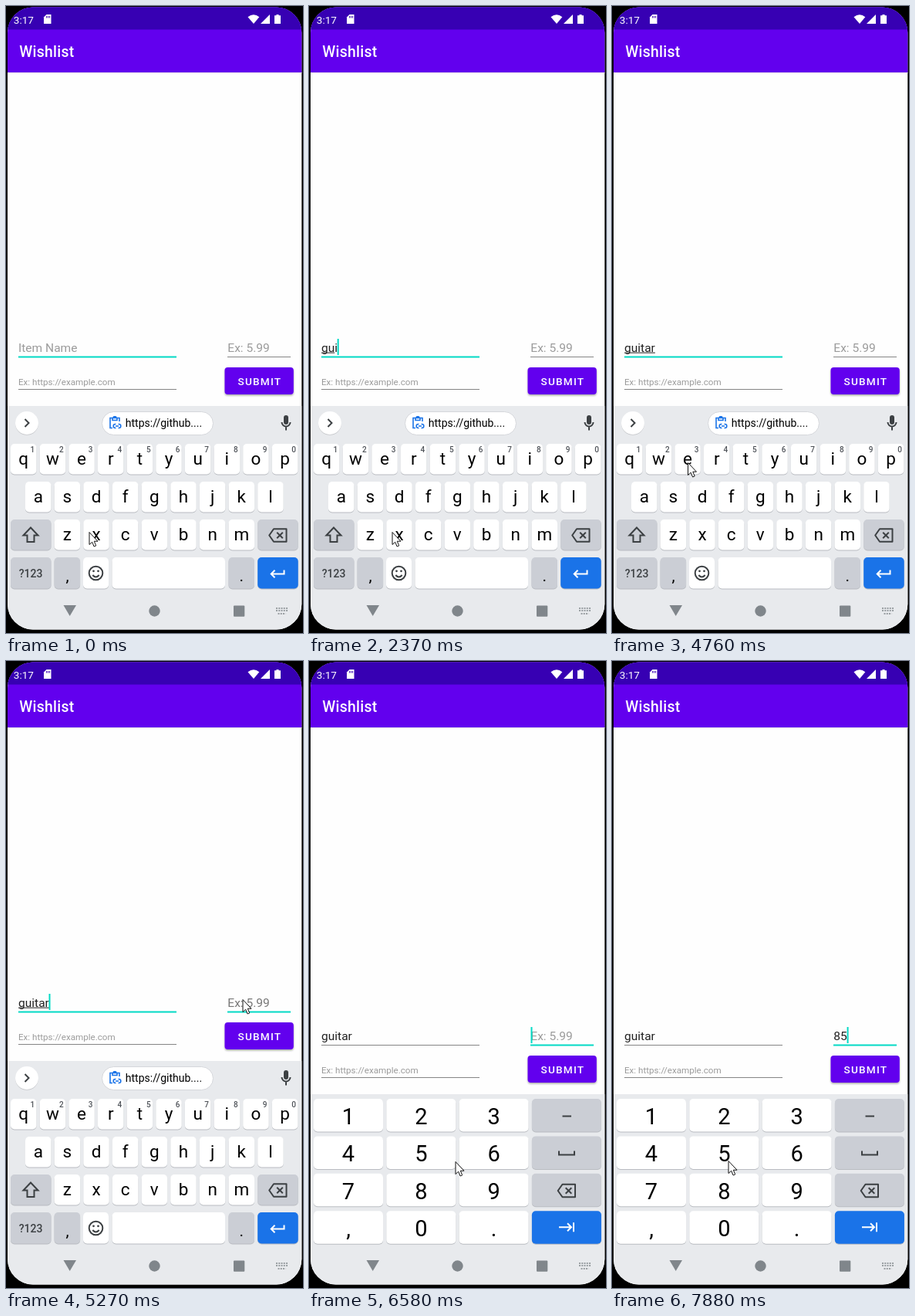
These frames come from a looping animation (385 by 812 pixels, 8000 ms). An HTML page:

```html
<!DOCTYPE html>
<html lang="en">
<head>
<meta charset="utf-8">
<title>Wishlist</title>
<style>
  html, body { margin: 0; width: 100%; height: 100%; overflow: hidden; background: #000; }
  svg { display: block; width: 100vw; height: 100vh; font-family: Roboto, sans-serif; }
  .mid { text-anchor: middle; }
  .medium { font-weight: 500; }
  .field { font-size: 15.55px; fill: #212121; }
  .hint { fill: #9b9b9b; }
  .line { fill: none; stroke: #3c4043; stroke-width: 2; }
</style>
</head>
<body>
<svg viewBox="0 0 385 812">
  <defs>
    <clipPath id="screen"><rect x="2" y="1.5" width="381.3" height="806" rx="33"/></clipPath>
    <filter id="lift" x="-10%" y="-10%" width="120%" height="150%">
      <feDropShadow dx="0" dy="1.5" stdDeviation="1.2" flood-opacity=".35"/>
    </filter>
    <g id="delete" class="line">
      <path d="M-5.5-8.3H11V8.3H-5.5L-11.3 0Z" stroke-linejoin="round"/>
      <path d="M-1.3-3.8 6.3 3.8M6.3-3.8-1.3 3.8"/>
    </g>
  </defs>
  <rect width="385" height="812"/>
  <g clip-path="url(#screen)">
    <rect width="385" height="812" fill="#fefefe"/>
    <rect y="86" width="385" height="1" fill="#e9e9e9"/>
    <rect width="385" height="86" fill="#6200ee"/>
    <rect width="385" height="30.5" fill="#3700b3"/>
    <g fill="#fff">
      <text x="9.8" y="22.5" font-size="13.6">3:17</text>
      <path d="M52.5 11H58.5V23H49V14.5Z"/>
      <path d="M52.5 13v2.5M54.5 13v2.5M56.5 13v2.5" stroke="#3700b3"/>
      <path d="M313.5 14.2Q321 8.500 328.300 14.200L321 23Z"/>
      <path d="M342 11V23H330Z"/>
      <path d="M350.500 11h3v1.300h2.500V23h-8V12.300h2.500Z"/>
      <text class="medium" x="17.300" y="66" font-size="19.4" letter-spacing=".24">Wishlist</text>
    </g>

    <g id="form">
      <rect id="nameLine" x="16" width="205"/>
      <rect id="priceLine" x="287" width="82"/>
      <rect x="16" y="496" width="205" height="1" fill="#858585"/>
      <text id="nameHint" class="field hint" x="16" y="447.6">Item Name</text>
      <text id="name" class="field" x="16" y="447.6"></text>
      <rect id="composing" x="16" y="448.6" height="1" fill="#212121"/>
      <text id="priceHint" class="field hint" x="287.3" y="447.6">Ex: 5.99</text>
      <text id="price" class="field" x="287.3" y="447.6"></text>
      <text class="hint" x="16" y="491" font-size="11.64">Ex: https://example.com</text>
      <rect id="caret" y="431" width="2" height="21" fill="#03dac5"/>
      <rect x="283.500" y="468" width="89.300" height="35" rx="4" fill="#6200ee" filter="url(#lift)"/>
      <text class="mid medium" x="328.900" y="490.700" font-size="13.6" letter-spacing="1.21" fill="#fff">SUBMIT</text>
    </g>

    <g id="letters">
      <rect y="518" width="385" height="294" fill="#e8eaed"/>
      <circle cx="27" cy="540.800" r="15" fill="#c9cbce"/>
      <circle cx="27" cy="540" r="15" fill="#fff"/>
      <path class="line" d="M24.500 535l5 5-5 5"/>
      <rect x="124.500" y="525.500" width="144" height="30" rx="15" fill="#fff" stroke="#d5d7db"/>
      <g fill="none" stroke="#1a73e8" stroke-width="1.600">
        <path d="M138 546.500H135V533.500H147V538M138 534v2.500h6V534"/>
        <path d="M142.500 541.500h-.8a2.500 2.500 0 0 0 0 5h.8M145.500 541.500h.8a2.500 2.500 0 0 1 0 5h-.8M142 544h4"/>
      </g>
      <rect x="138.500" y="531" width="5" height="3" rx="1.500" fill="#1a73e8"/>
      <text x="154.800" y="545.300" font-size="14">https://github....</text>
      <rect x="360" y="530" width="6" height="12" rx="3" fill="#3c4043"/>
      <path class="line" stroke-width="1.700" d="M357.500 539a5.500 5.500 0 0 0 11 0M363 545v4.500"/>
      <g id="letterKeys"></g>
      <path class="line" d="M32 675.500 22.500 685.500H27.500V694H36.500V685.500H41.500Z"/>
      <use href="#delete" x="352.500" y="685.500"/>
      <circle class="line" cx="116.500" cy="734.500" r="8.800" stroke-width="1.800"/>
      <path class="line" d="M112.300 737q4.200 5 8.400 0"/>
      <circle cx="113.500" cy="731.800" r="1.400" fill="#3c4043"/>
      <circle cx="119.500" cy="731.800" r="1.400" fill="#3c4043"/>
      <path d="M360.500 730.500V735.500H344M348.500 730.700 343.700 735.500 348.500 740.300" fill="none" stroke="#fff" stroke-width="2"/>
    </g>

    <g id="digits">
      <rect y="561" width="385" height="251" fill="#e8eaed"/>
      <g id="digitKeys"></g>
      <path class="line" d="M328.500 589.500h11.500M324 634.500v5h20v-5"/>
      <use href="#delete" x="334" y="686"/>
      <path d="M324 733.200h15M335 728.200l5 5-5 5M343 727.200v12" fill="none" stroke="#fff" stroke-width="2"/>
    </g>

    <g fill="#80868b">
      <path d="M74.500 776H91L82.700 790Z"/>
      <circle cx="192.500" cy="783.500" r="7.200"/>
      <rect x="295" y="776.500" width="14.300" height="14.300" rx="1"/>
      <path d="M350 780h15M350 783h15M352.500 787h10" fill="none" stroke="#80868b" stroke-width="1.600" stroke-dasharray="2 1.250"/>
    </g>
  </g>
  <path id="pointer" d="M.5.500V16.500L4.200 13.200 6.600 19 9.200 17.900 6.800 12.200H11.500Z" fill="#fff" stroke="#111"/>
</svg>
<script>
const $ = id => document.getElementById(id);
const GREY = '#cbced5', BLUE = '#1a73e8';

function key(x, y, w, h, fill = '#fff') {
  const box = (dy, color) =>
    `<rect x="${x}" y="${y + dy}" width="${w}" height="${h}" rx="5" fill="${color}"/>`;
  return box(1, '#b9bcc1') + box(0, fill);
}
const label = (text, x, y, size, extra = '') =>
  `<text class="mid ${extra}" x="${x}" y="${y}" font-size="${size}">${text}</text>`;

function letterKeys() {
  const pitch = 37.65, width = 33.5;
  let out = '';
  [['qwertyuiop', 6, 567], ['asdfghjkl', 25, 616], ['zxcvbnm', 62.600, 665]].forEach(([row, left, y], r) => {
    [...row].forEach((char, i) => {
      const x = left + i * pitch;
      out += key(x, y, width, 39.5) + label(char, x + width / 2, y + 27, 22.5);
      if (r === 0) out += `<g fill="#50545a">${label((i + 1) % 10, x + 28.300, y + 11, 10, 'medium')}</g>`;
    });
  });
  out += key(6, 665, 52.500, 39.500, GREY) + key(326.200, 665, 52.500, 39.500, GREY);
  out += key(6, 714, 52.500, 40.500, GREY) + key(62.600, 714, width, 40.500, GREY);
  out += key(100, 714, 33, 40.500) + key(137.500, 714, 146.500, 40.500);
  out += key(288.500, 714, width, 40.500, GREY) + key(326.200, 714, 52.500, 40.500, BLUE);
  out += `<g fill="#3c4043">${label('?123', 32, 740, 14, 'medium')}</g>`;
  return out + label(',', 79.500, 745, 21) + label('.', 305.300, 745, 21);
}

function digitKeys() {
  let out = '';
  ['123 ', '456 ', '789 ', ',0. '].forEach((row, r) => [...row].forEach((char, c) => {
    const x = 6 + c * 94.3, y = 567 + r * 48.4;
    const fill = c < 3 ? '#fff' : r < 3 ? GREY : BLUE;
    out += key(x, y, 90, 42.500, fill) + label(char, x + 45, y + 33, 29);
  }));
  return out;
}

$('letterKeys').innerHTML = letterKeys();
$('digitKeys').innerHTML = digitKeys();

// [time, text, underlined characters, caret shown]
const nameTrack = [
  [0, '', 0, 0], [370, '', 0, 1], [780, '', 0, 0], [1310, '', 0, 1], [1850, '', 0, 0],
  [2000, 'g', 0, 1], [2120, 'g', 1, 1], [2370, 'gui', 2, 1], [2640, 'gui', 3, 1],
  [2760, 'guit', 4, 1], [2910, 'guita', 4, 1], [3160, 'guita', 5, 1],
  [3690, 'guitar', 5, 1], [3960, 'guitar', 6, 1], [4360, 'guitar', 6, 0],
  [4880, 'guitar', 6, 1], [5390, 'guitar', 0, 0]
];
// [time, text, caret shown]
const priceTrack = [
  [0, '', 0], [5390, '', 1], [5920, '', 0], [6580, '', 1], [7240, '', 0],
  [7360, '8', 1], [7880, '85', 1]
];
// [time, x, y]
const pointerTrack = [
  [0, 107.500, 681], [4610, 74.500, 623], [4760, 98, 591], [4880, 172, 524], [5000, 258, 466],
  [5120, 306.500, 438], [5920, 304, 462], [6070, 291, 505], [6190, 268, 560],
  [6310, 238, 612], [6430, 215, 636], [6580, 189.500, 648], [6700, 170, 643],
  [6820, 156, 639], [6970, 153, 660], [7090, 151, 675.500], [7480, 150, 660], [7600, 150.500, 647]
];
const at = (track, t) => track.findLast(step => step[0] <= t).slice(1);
const show = (id, on) => $(id).setAttribute('visibility', on ? 'visible' : 'hidden');

function set(id, attrs) {
  for (const [attr, value] of Object.entries(attrs)) $(id).setAttribute(attr, value);
}
const underline = (id, focused) => set(id, focused
  ? { y: 453.5, height: 2, fill: '#03dac5' }
  : { y: 454, height: 1, fill: '#858585' });

function draw(t) {
  const [name, marked, nameCaret] = at(nameTrack, t);
  const [price, priceCaret] = at(priceTrack, t);
  const [x, y] = at(pointerTrack, t);
  const numeric = t >= 5390;

  $('name').textContent = name;
  $('price').textContent = price;
  show('nameHint', !name);
  show('priceHint', !price);
  $('priceHint').style.fill = t >= 5270 && !numeric ? '#777' : '';
  underline('nameLine', !numeric);
  underline('priceLine', t >= 5270);
  set('composing', { width: marked ? $('name').getSubStringLength(0, marked) : 0 });

  const active = $(numeric ? 'price' : 'name');
  const advance = active.textContent ? active.getComputedTextLength() : 0;
  set('caret', { x: (numeric ? 287.5 : 16) + advance - (advance ? .4 : 0) });
  show('caret', numeric ? priceCaret : nameCaret);

  set('form', { transform: `translate(0 ${numeric ? 43 : 0})` });
  show('letters', !numeric);
  show('digits', numeric);
  set('pointer', { transform: `translate(${x} ${y})` });
}

function loop() {
  draw(performance.now() % 8000);
  requestAnimationFrame(loop);
}
loop();
</script>
</body>
</html>
```
